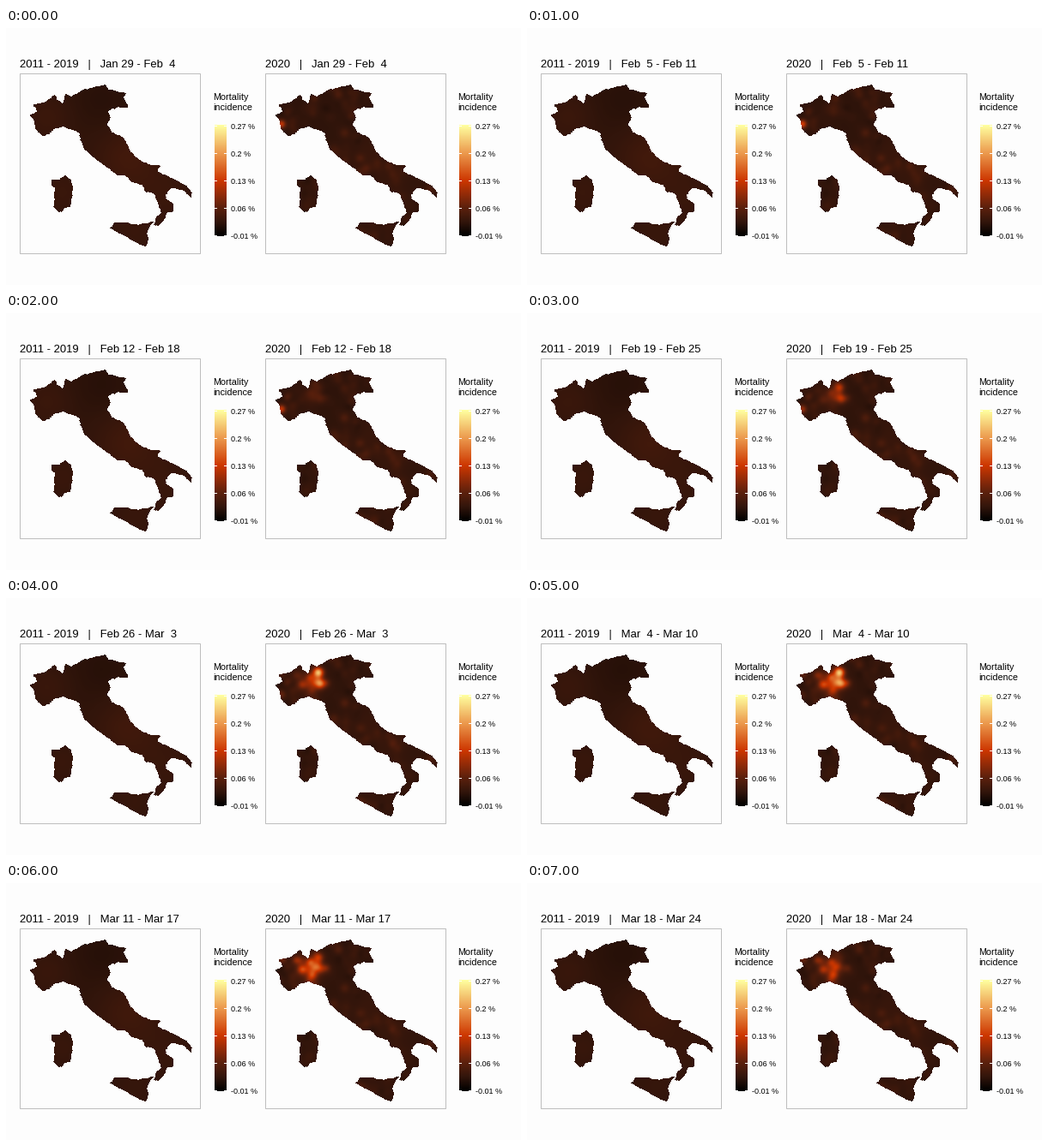
A matplotlib script that plays this animation: 600x300 px, repeating every 8 s.

```python
import numpy as np
import matplotlib.pyplot as plt
from matplotlib.animation import FuncAnimation
from matplotlib.colors import LinearSegmentedColormap, Normalize
from matplotlib.patches import Rectangle
from matplotlib.path import Path

W, H, DPI = 600, 300, 100
PX = 72 / DPI
WEEKS = 8
LEFT, TOP, SIZE = 16, 53, 211      # first map panel
SHIFT = 286                        # distance between the panels

# Key points of the coasts and borders, clockwise
MAINLAND = [
    (43, 126), (34, 118), (33, 107), (28, 102), (37, 97), (31, 89), (45, 87),
    (57, 78), (60, 84), (66, 88), (70, 77), (76, 80), (84, 76), (90, 72),
    (100, 70), (116, 66), (119, 72), (141, 76), (137, 81), (143, 93),
    (131, 92), (119, 97), (122, 105), (118, 113), (123, 121), (138, 129),
    (145, 144), (157, 155), (168, 160), (180, 160), (176, 167), (191, 174),
    (209, 183), (217, 192), (215, 198), (207, 190), (193, 186), (186, 195),
    (187, 200), (195, 205), (195, 214), (187, 216), (185, 223), (178, 231),
    (172, 230), (175, 221), (181, 216), (178, 207), (172, 193), (162, 191),
    (158, 183), (147, 180), (139, 172), (130, 172), (118, 163), (100, 150),
    (91, 141), (87, 131), (85, 122), (66, 115), (56, 118), (51, 124)]
SARDINIA = [(53, 177), (61, 177), (69, 172), (76, 178), (78, 186), (75, 209),
            (68, 210), (65, 215), (60, 214), (56, 209), (57, 186), (53, 184)]
SICILY = [(121, 234), (126, 227), (139, 227), (154, 230), (172, 226),
          (164, 239), (166, 246), (163, 255), (154, 252), (138, 243)]

# Outbreaks: x, y, radius, peak in 0.01 %, peak week, duration
OUTBREAKS = [(78, 87, 4, 21, 4.5, 1.6), (80, 100, 4, 15, 4.4, 1.8),
             (71, 107, 4, 9, 6.3, 2.4), (59, 101, 4, 5, 5.5, 2.2),
             (66, 99, 12, 4, 5.6, 2.2), (35, 112, 3.5, 11, 1, 3)]

heat = LinearSegmentedColormap.from_list("heat", [
    (0, "#000000"), (.125, "#32150b"), (.25, "#5a200d"), (.375, "#922b08"),
    (.5, "#cd3700"), (.75, "#ec9a4e"), (1, "#ffff9f")], N=512)
scale = Normalize(-1, 27, clip=True)
rng = np.random.default_rng(7)
gx, gy = np.meshgrid(LEFT + np.arange(SIZE) + .5, TOP + np.arange(SIZE) + .5)


def roughen(points, steps=5, jitter=.35):
    """Split every edge into short pieces and shake them a little."""
    pts = np.array(points, float)
    t = np.arange(steps)[None, :, None] / steps
    fine = pts[:, None] * (1 - t) + np.roll(pts, -1, axis=0)[:, None] * t
    return fine.reshape(-1, 2) + rng.normal(0, jitter, (len(pts) * steps, 2))


def land_mask():
    pixels = np.column_stack([gx.ravel(), gy.ravel()])
    inside = [Path(roughen(coast)).contains_points(pixels)
              for coast in (MAINLAND, SARDINIA, SICILY)]
    return np.any(inside, axis=0).reshape(gx.shape)


def blob(x, y, r):
    return np.exp(-((gx - x) ** 2 + (gy - y) ** 2) / (2 * r * r))


def wave(week, peak, duration):
    return np.exp(-((week - peak) / duration) ** 2)


land = land_mask()
rows, cols = np.nonzero(land)
speckles = [(blob(cols[k] + LEFT, rows[k] + TOP, rng.uniform(3, 4.5)),
             rng.uniform(-.7, 1.3), rng.uniform(0, 2 * np.pi))
            for k in rng.choice(len(rows), 120, replace=False)]
scatter = [(rng.normal(62, 14), rng.normal(99, 7), 3.5, rng.uniform(2, 5),
            rng.uniform(5, 7), 2.5) for _ in range(14)]
outbreaks = [(blob(x, y, r), peak, when, duration)
             for x, y, r, peak, when, duration in OUTBREAKS + scatter]
south = 1.5 * blob(142, 152, 25) + .8 * blob(185, 195, 25)
islands = .8 * blob(65, 192, 16) + .6 * blob(148, 240, 18)
average = 2.4 + south + islands + .9 * blob(48, 104, 18) - .5 * blob(112, 85, 22)


def average_field(week):
    return average * (1 - .01 * week)


def current_field(week):
    field = 2.3 + .5 * (south + islands)
    for shape, size, phase in speckles:
        field = field + shape * size * (1 + .4 * np.sin(phase + .8 * week))
    for shape, peak, when, duration in outbreaks:
        field = field + shape * peak * wave(week, when, duration)
    return np.maximum(field, .8)


def colours(field):
    rgba = heat(scale(field))
    rgba[..., 3] = land
    return rgba


def date(day):
    """Calendar text for a day counted from the start of January."""
    for month, length in (("Jan", 31), ("Feb", 29), ("Mar", 31)):
        if day <= length:
            return f"{month} {day:2d}"
        day -= length


fig = plt.figure(figsize=(W / DPI, H / DPI), dpi=DPI, facecolor="#fdfdfd")
ax = fig.add_axes([0, 0, 1, 1])
ax.axis("off")


def label(x, y, text, size):
    return ax.text(x, y, text, fontsize=size * PX, family="Liberation Sans",
                   color="black", va="baseline")


def legend(x):
    label(x - .5, 84, "Mortality", 10.8)
    label(x - .5, 96, "incidence", 10.8)
    ramp = np.linspace(1, 0, 130)[:, None]
    ax.imshow(heat(ramp), extent=(x + 1, x + 15, 243, 113),
              interpolation="nearest")
    for i, text in enumerate(["0.27 %", "0.2 %", "0.13 %", "0.06 %", "-0.01 %"]):
        y = 114.5 + 32 * i
        for x0 in (x + 1, x + 12):
            ax.plot([x0, x0 + 3], [y, y], color="white", lw=PX,
                    solid_capstyle="butt", snap=False)
        label(x + 20, y + 3.8, text, 9)


def panel(x):
    image = ax.imshow(colours(average), interpolation="nearest",
                      extent=(x, x + SIZE, TOP + SIZE, TOP), zorder=1)
    ax.add_patch(Rectangle((x + .5, TOP + .5), SIZE - 1, SIZE - 1, fill=False,
                           ec="#bebebe", lw=PX, snap=False, zorder=2))
    return image, label(x - .3, 46, "", 13)


panels = [panel(LEFT), panel(LEFT + SHIFT)]
legend(242)
legend(527)
ax.set_aspect("auto")
ax.set_xlim(0, W)
ax.set_ylim(H, 0)


def draw(week):
    start = 29 + 7 * week
    span = f"{date(start)} - {date(start + 6)}"
    fields = average_field(week), current_field(week)
    for (image, title), field, years in zip(panels, fields, ("2011 - 2019", "2020")):
        image.set_data(colours(field))
        title.set_text(f"{years}   |   {span}")
    return [artist for pair in panels for artist in pair]


anim = FuncAnimation(fig, draw, frames=WEEKS, interval=1000,
                     repeat=True, repeat_delay=0)
plt.show()
```
